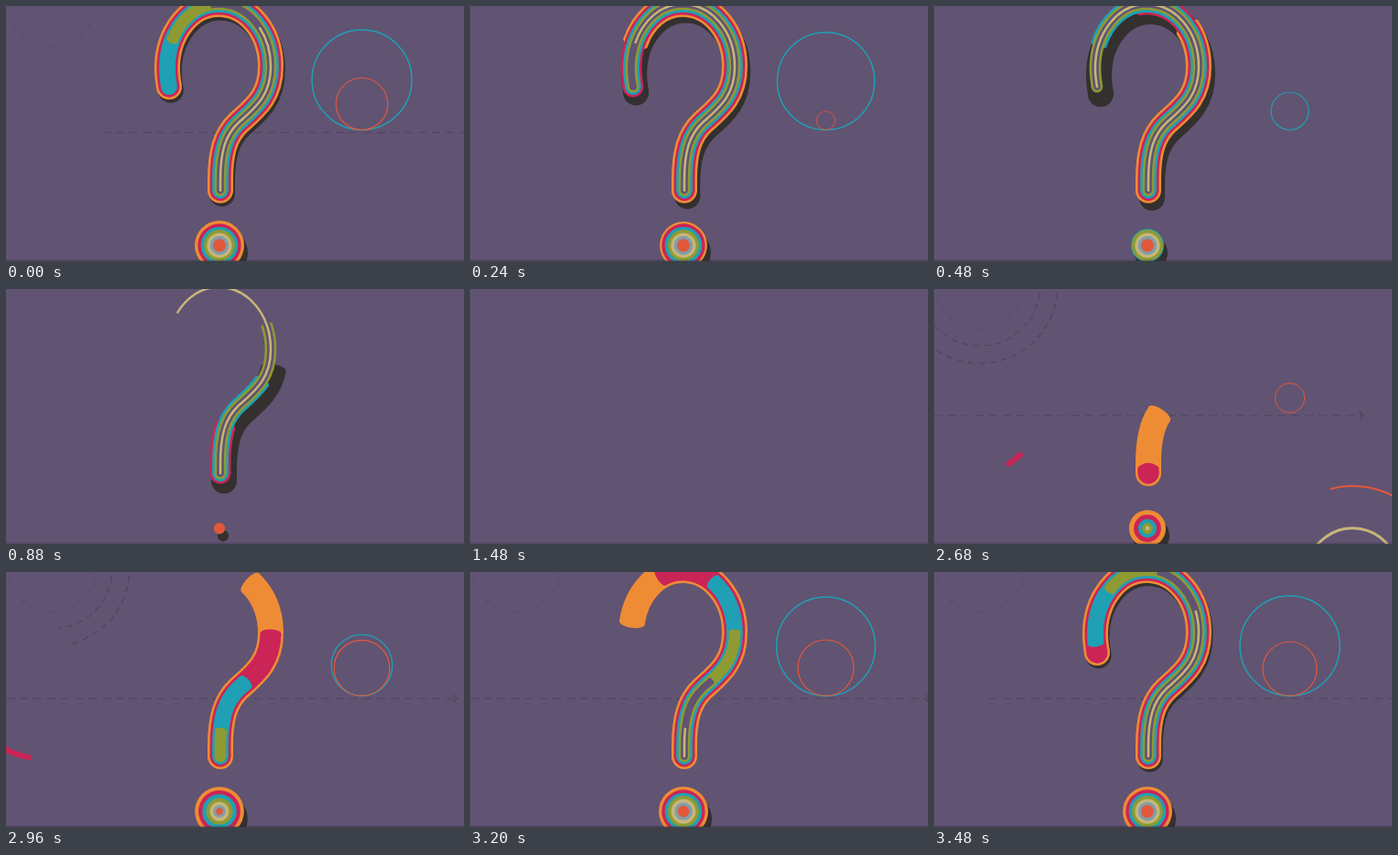
Write an HTML page with a canvas that moves like this. It is 500 px wide and 278 px high and loops after 3520 ms.

```html
<!DOCTYPE html>
<html lang="en">
<head>
<meta charset="utf-8">
<title>Question mark</title>
<style>
  html, body { margin: 0; width: 100%; height: 100%; overflow: hidden; background: #615372; }
  canvas { display: block; width: 500px; height: 278px; }
</style>
</head>
<body>
<canvas id="stage" width="500" height="278"></canvas>
<script>
const ctx = document.getElementById('stage').getContext('2d');
const LOOP = 3520, STEP = 40, TAU = Math.PI * 2, RAD = Math.PI / 180;

const BG = '#615372', LINE = '#504361', SHADE = '#33302f';
const ORANGE = '#ee8c35', CRIMSON = '#cb2457', TEAL = '#1fa0b4', OLIVE = '#8f9a33',
      TAN = '#c6b67a', GREY = '#829da9', RED = '#e2583a';

// Centre line of the mark, from its foot to the tip of the hook
const D = 'M234 201 L234 190 C234 160 239 141 254 127 C272 111 289 98 289 66 ' +
          'C289 28 264 -2 232 -2 C200 -2 176 30 176 68 C176 75 177 82 178 88';
const mark = new Path2D(D);
const probe = document.createElementNS('http://www.w3.org/2000/svg', 'path');
probe.setAttribute('d', D);
const FULL = probe.getTotalLength();

const stripes = [ORANGE, CRIMSON, TEAL, OLIVE, BG, TAN];
const rings = [ORANGE, CRIMSON, TEAL, OLIVE, TAN, GREY, RED];

const ramp = (t, from, to) => Math.min(1, Math.max(0, (t - from) / (to - from)));
const easeIn = (t, from, to, n = 2) => ramp(t, from, to) ** n;
const easeOut = (t, from, to, n = 2.5) => 1 - (1 - ramp(t, from, to)) ** n;
const decay = (t, start, tau) => Math.exp(-Math.max(0, t - start) / tau);

function disc(x, y, r, color) {
  if (r <= 0) return;
  ctx.fillStyle = color;
  ctx.beginPath();
  ctx.arc(x, y, r, 0, TAU);
  ctx.fill();
}

function arc(x, y, r, from, to, color, width, cap = 'butt') {
  if (r <= 0 || to <= from) return;
  ctx.strokeStyle = color;
  ctx.lineWidth = width;
  ctx.lineCap = cap;
  ctx.beginPath();
  ctx.arc(x, y, r, from * RAD, to * RAD);
  ctx.stroke();
}

// Dashed arc running anticlockwise from tail to head
function dashedArc(r, tail, head, alpha) {
  if (tail <= head || alpha <= 0) return;
  ctx.save();
  ctx.globalAlpha = alpha;
  ctx.strokeStyle = LINE;
  ctx.lineWidth = 1.2;
  ctx.setLineDash([7, 5]);
  ctx.lineDashOffset = (180 - tail) * RAD * r;
  ctx.beginPath();
  ctx.arc(50, -4, r, tail * RAD, head * RAD, true);
  ctx.stroke();
  ctx.restore();
}

// Stripe of the mark whose domed head has travelled to `apex`
function stripe(apex, color, width) {
  if (apex <= 0) return;
  const r = width / 2;
  const len = Math.min(FULL, Math.max(0.1, apex - 0.4 * r));
  const depth = Math.min(r, apex - len);
  ctx.save();
  ctx.strokeStyle = color;
  ctx.lineWidth = width;
  ctx.lineCap = 'butt';
  if (len < FULL) ctx.setLineDash([len, 999]);
  ctx.stroke(mark);
  ctx.restore();
  disc(234, 201, r, color);
  if (depth > 0) {
    const a = probe.getPointAtLength(Math.max(0, len - 1));
    const b = probe.getPointAtLength(len);
    ctx.beginPath();
    ctx.ellipse(b.x, b.y, depth, r, Math.atan2(b.y - a.y, b.x - a.x), 0, TAU);
    ctx.fill();
  }
}

function dashedRings(t) {
  const tail = 180 * (1 - easeIn(t, 2500, 3117));
  dashedArc(85, tail, 180 * decay(t, 1850, 160), 1);
  dashedArc(66, tail + 3, 180 * decay(t, 1870, 165), 0.9);
  dashedArc(48, 170, 180 * decay(t, 2400, 120), 0.4 * (1 - ramp(t, 3520, 3640)));
}

function arrow(t) {
  const head = 510 * (1 - decay(t, 1850, 330));
  const tail = 510 * easeIn(t, 3382, 3683);
  if (head <= tail) return;
  ctx.save();
  ctx.strokeStyle = LINE;
  ctx.lineWidth = 1.2;
  ctx.lineCap = 'butt';
  ctx.setLineDash([9, 6]);
  ctx.lineDashOffset = tail;
  ctx.beginPath();
  ctx.moveTo(tail, 138);
  ctx.lineTo(head, 138);
  ctx.stroke();
  ctx.setLineDash([]);
  ctx.beginPath();
  ctx.moveTo(head - 4, 134);
  ctx.lineTo(head, 138);
  ctx.lineTo(head - 4, 142);
  ctx.stroke();
  ctx.restore();
}

// Angle that swings up to `low` and falls back again
const swing = (t, low, arrive, turn, end) =>
  160 - (160 - low) * (easeOut(t, 1880, arrive) - easeIn(t, turn, end, 1.5));

function sweep(t, r, color, width, start, end) {
  const angle = from => 190 + 160 * ramp(t, from, from + 300);
  const grow = 1 + 0.045 * ramp(t, 2200, 2680);
  arc(457, 311, r * grow, angle(end), angle(start), color, width);
}

function arcs(t) {
  arc(38, 121, 82, swing(t, 30, 2200, 2500, 3200), swing(t, 50, 2600, 2600, 3060),
      CRIMSON, 6, 'round');
  sweep(t, 48, TAN, 3, 1880, 2690);
  sweep(t, 70, TEAL, 2.2, 1880, 2020);
  sweep(t, 92, RED, 2, 2151, 2558);
}

// Ring resting on the dashed line that grows, then shrinks away
function bubble(t, size, color, width, grow, shrink, end) {
  const r = size * easeOut(t, grow, grow + 460) * (1 - easeIn(t, shrink, end));
  arc(388.5, 135 - r, r, 0, 360, color, width * (0.6 + 0.4 * r / size));
}

function dot(t) {
  const radii = rings.map((_, k) =>
    (27 - 3.35 * k) * easeOut(t, 2360 + 65 * k, 3010 + 65 * k, 2) *
    (1 - easeIn(t, 3700 + 100 * k, 4000 + 100 * k)));
  disc(237, 269, Math.max(...radii), SHADE);
  radii.forEach((r, k) => disc(233, 261, r, rings[k]));
}

function question(t) {
  const speed = 0.52;
  const apex = (k, width) => Math.min(FULL + width / 2, speed * (t - 2540 - 120 * k));
  const since = start => Math.max(0, t - start);

  const drop = ramp(t, 3200, 3900);
  ctx.save();
  ctx.translate(4 * drop, 8 * drop);
  if (drop > 0) stripe(apex(0, 28) - 0.6 * since(4000), SHADE, 28);
  ctx.restore();

  stripes.forEach((color, k) => {
    const width = 28 - 5.1 * k;
    stripe(apex(k, width) - speed * since(3650 + 125 * k), color, width);
  });
}

function draw(now) {
  const time = Math.floor((now % LOOP) / STEP) * STEP;
  const t = time < 1800 ? time + LOOP : time;
  ctx.fillStyle = BG;
  ctx.fillRect(0, 0, 500, 278);
  dashedRings(t);
  arrow(t);
  arcs(t);
  bubble(t, 54.5, TEAL, 1.5, 2815, 3699, 4080);
  bubble(t, 30.5, RED, 1.2, 2560, 3400, 3840);
  dot(t);
  question(t);
  ctx.fillStyle = 'rgba(50, 40, 62, 0.3)';
  ctx.fillRect(0, 276.5, 500, 1.5);
}

function loop() {
  draw(performance.now());
  requestAnimationFrame(loop);
}
loop();
</script>
</body>
</html>
```
